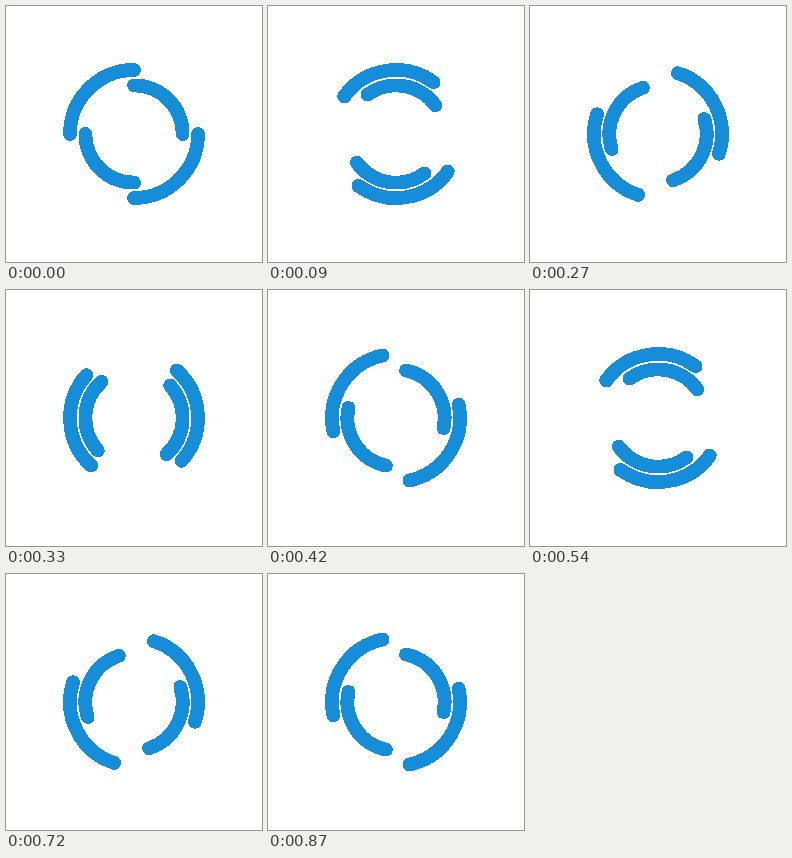
An HTML page for the animation above (900 ms loop, 256x256 px).

```html
<!DOCTYPE html>
<html lang="en">
<head>
<meta charset="utf-8">
<title>Double ring spinner</title>
<style>
  html, body { margin: 0; width: 100%; height: 100%; overflow: hidden; background: #fff; }
  svg { display: block; width: 100%; height: 100%; }
  path { fill: none; stroke: #000; stroke-width: 12.8; stroke-linecap: round; }
</style>
</head>
<body>
<svg viewBox="0 0 256 256">
  <!-- Hard edges: every touched pixel becomes solid blue. -->
  <filter id="solid" filterUnits="userSpaceOnUse" x="-128" y="-128" width="256" height="256"
          color-interpolation-filters="sRGB">
    <feComponentTransfer in="SourceAlpha" result="mask">
      <feFuncA type="linear" slope="255" intercept="-8"/>
    </feComponentTransfer>
    <feFlood flood-color="#168dd9"/>
    <feComposite operator="in" in2="mask"/>
  </filter>
  <g transform="translate(128 128)" filter="url(#solid)">
    <path id="outer" d="M-64 0A64 64 0 0 1 0-64M64 0A64 64 0 0 1 0 64"/>
    <path id="inner" d="M0-48.64A48.64 48.64 0 0 1 48.64 0M0 48.64A48.64 48.64 0 0 1-48.64 0"/>
  </g>
</svg>
<script>
  const LOOP = 900, STEP = 30, SLACK = 1;
  const outer = document.getElementById('outer');
  const inner = document.getElementById('inner');
  const start = performance.now();

  // The rings counter-rotate one full turn per loop, in 30 ms ticks.
  function draw(ms) {
    const tick = Math.floor(((ms + SLACK) % LOOP) / STEP);
    const angle = tick * STEP / LOOP * 360;
    outer.setAttribute('transform', `rotate(${angle})`);
    inner.setAttribute('transform', `rotate(${-angle})`);
  }

  function frame() {
    draw(performance.now() - start);
    requestAnimationFrame(frame);
  }
  frame();
</script>
</body>
</html>
```
